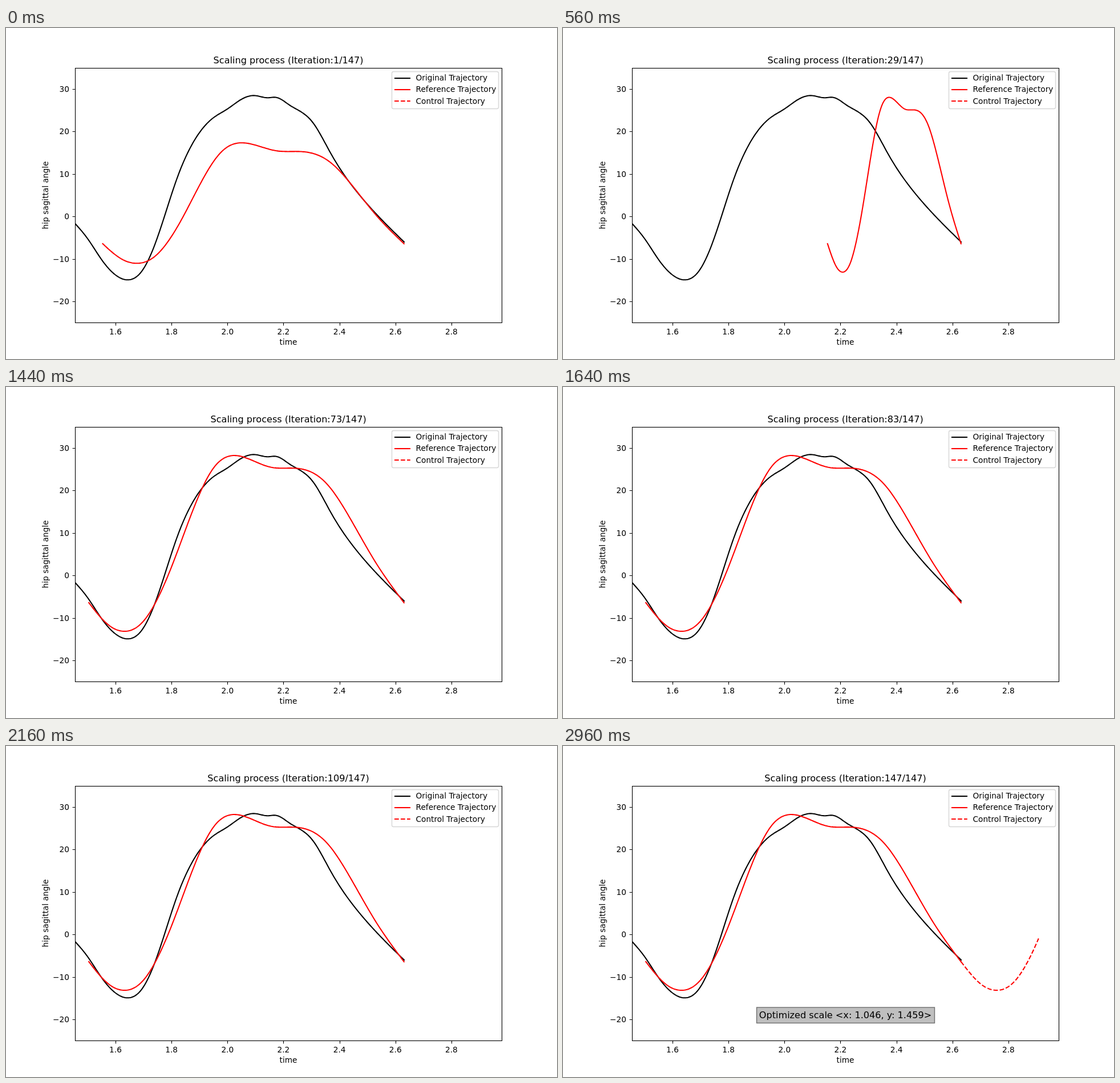
An HTML page for the animation above (4160 ms loop, 966x580 px).

```html
<!DOCTYPE html>
<html lang="en">
<head>
<meta charset="utf-8">
<title>Scaling process</title>
<style>
  html, body { margin: 0; width: 100%; height: 100%; overflow: hidden; background: #fff; }
  svg { display: block; width: 966px; height: 580px; }
  text { font: 13.7px "DejaVu Sans", Verdana, sans-serif; }
  .big { font-size: 16.1px; }
  .mid { text-anchor: middle; }
  .end { text-anchor: end; }
  .line { fill: none; stroke-width: 2.083; stroke-linejoin: round; stroke-linecap: square; }
  .dash { stroke-dasharray: 7.7 3.33; stroke-linecap: butt; }
  .axis { fill: none; stroke: #000; stroke-width: 1.11; }
</style>
</head>
<body>
<svg viewBox="0 0 966 580">
  <defs><clipPath id="area"><rect x="121" y="70" width="748.6" height="446.5"/></clipPath></defs>
  <rect width="966" height="580" fill="#fff"/>
  <g clip-path="url(#area)">
    <path id="measured" class="line" stroke="#000"/>
    <path id="reference" class="line" stroke="#f00"/>
    <path id="control" class="line dash" stroke="#f00"/>
  </g>
  <path id="ticks" class="axis"/>
  <rect class="axis" x="121.5" y="70.5" width="748" height="446"/>
  <g id="labels"></g>
  <text class="mid" x="495" y="555">time</text>
  <text class="mid" transform="translate(74 293) rotate(-90)">hip sagittal angle</text>
  <text id="title" class="mid big" x="495.1" y="62"></text>
  <rect x="676.5" y="76.5" width="187" height="65" rx="2.8" fill="#fff" fill-opacity=".8" stroke="#ccc" stroke-opacity=".8" stroke-width="1.39"/>
  <path class="line" stroke="#000" d="M682 88H708"/>
  <path class="line" stroke="#f00" d="M682 108H708"/>
  <path class="line dash" stroke="#f00" d="M681 128H708.8"/>
  <text x="718.5" y="92">Original Trajectory</text>
  <text x="718.5" y="112">Reference Trajectory</text>
  <text x="718.5" y="133">Control Trajectory</text>
  <g id="result">
    <rect x="339.5" y="458" width="312" height="27.5" fill="#808080" fill-opacity=".5" stroke="#000" stroke-opacity=".5" stroke-width="1.39"/>
    <text class="mid big" x="495" y="477">Optimized scale &lt;x: 1.046, y: 1.459&gt;</text>
  </g>
</svg>
<script>
const $ = id => document.getElementById(id);
const STEP = 40, LOOP = 4160, TOTAL = 147, LAST = 74;
const START_X = 169.5, END_X = 697.8, BASE_Y = 378;

// Natural cubic spline through a few knots, sampled every 2 px.
function spline(knots) {
  const p = knots, n = p.length - 1;
  const gap = i => p[i + 1][0] - p[i][0];
  const rise = i => (p[i + 1][1] - p[i][1]) / gap(i);
  const c = [0], d = [0], m = Array(n + 1).fill(0);
  for (let i = 1; i < n; i++) {
    const a = gap(i - 1), b = gap(i), den = 2 * (a + b) - a * c[i - 1];
    c[i] = b / den;
    d[i] = (6 * (rise(i) - rise(i - 1)) - a * d[i - 1]) / den;
  }
  for (let i = n - 1; i > 0; i--) m[i] = d[i] - c[i] * m[i + 1];

  const out = [];
  for (let x = p[0][0], i = 0; x < p[n][0]; x += 2) {
    while (x > p[i + 1][0]) i++;
    const h = gap(i), s = (x - p[i][0]) / h, r = 1 - s;
    out.push([x, r * p[i][1] + s * p[i + 1][1]
      + h * h / 6 * ((r ** 3 - r) * m[i] + (s ** 3 - s) * m[i + 1])]);
  }
  out.push(p[n]);
  return out;
}

const toPath = pts => "M" + pts.map(([x, y]) => x.toFixed(2) + " " + y.toFixed(2)).join("L");

const measured = spline([
  [121, 342.5], [143, 369], [167, 405], [191, 432], [214, 441.3], [236, 428.8],
  [260, 382], [300, 263], [338, 185], [362, 158.5], [388, 142], [413, 124.8],
  [437, 118.5], [458, 122.2], [474, 121.7], [497, 135], [537, 164.5],
  [569, 219], [620, 293], [698, 375]]);

const shape = spline([
  [START_X, BASE_Y], [203, 405], [230, 412.3], [258, 402.5], [310, 331.5],
  [356, 246], [380, 214.8], [412, 201.2], [440, 206], [475, 215.3], [518, 216.6],
  [545, 222], [570, 236.5], [602, 270], [650, 329.3], [END_X, BASE_Y]]);

const scaled = (pts, sx, sy, shift = 0) => pts.map(([x, y]) =>
  [END_X + (x - END_X) * sx + shift, BASE_Y + (y - BASE_Y) * sy]);

// Line searches alternate between x and y: each probes around its start, then settles.
const PROBES = [0, 1, -1.618, 0, -0.618, 0.382];
const ROUGH = [1.061, 1.451], BEST = [1.046, 1.459];

function scaleAt(n) {
  const scale = [1, 1];
  for (let k = 0; k < 10; k++) {
    const i = n - Math.floor(2 + 11.5 * k + 0.105 * k * k);
    if (i < 0) break;
    const axis = k % 2;
    scale[axis] = i < PROBES.length ? scale[axis] + PROBES[i] : (k < 2 ? ROUGH : BEST)[axis];
  }
  return scale;
}

function drawAxes() {
  let d = "", html = "";
  for (let i = 0; i < 7; i++) {
    const x = 192 + 98.15 * i;
    d += `M${Math.round(x) + 0.5} 516.5v4.9`;
    html += `<text class="mid" x="${x}" y="537">${(1.6 + 0.2 * i).toFixed(1)}</text>`;
  }
  for (let v = -20; v <= 30; v += 10) {
    const y = Math.round(69.6 + (35 - v) * 7.443);
    d += `M121.5 ${y + 0.5}h-4.9`;
    html += `<text class="end" x="111" y="${y + 5}">${String(v).replace("-", "\u2212")}</text>`;
  }
  $("ticks").setAttribute("d", d);
  $("labels").innerHTML = html;
}

let shown = -1;
function render(t) {
  const step = Math.min(Math.floor(t / STEP), LAST);
  if (step === shown) return;
  shown = step;
  const n = Math.min(1 + 2 * step, TOTAL);
  $("title").textContent = `Scaling process (Iteration:${n}/${TOTAL})`;
  $("reference").setAttribute("d", toPath(scaled(shape, ...scaleAt(n))));
  const done = step === LAST ? "visible" : "hidden";
  $("control").setAttribute("visibility", done);
  $("result").setAttribute("visibility", done);
}

drawAxes();
$("measured").setAttribute("d", toPath(measured));
const head = shape.filter(p => p[0] < 300);
$("control").setAttribute("d", toPath(scaled(head, ...BEST, (END_X - START_X) * BEST[0])));

const begin = performance.now();
function tick() {
  render((performance.now() - begin) % LOOP);
  requestAnimationFrame(tick);
}
render(0);
requestAnimationFrame(tick);
</script>
</body>
</html>
```
